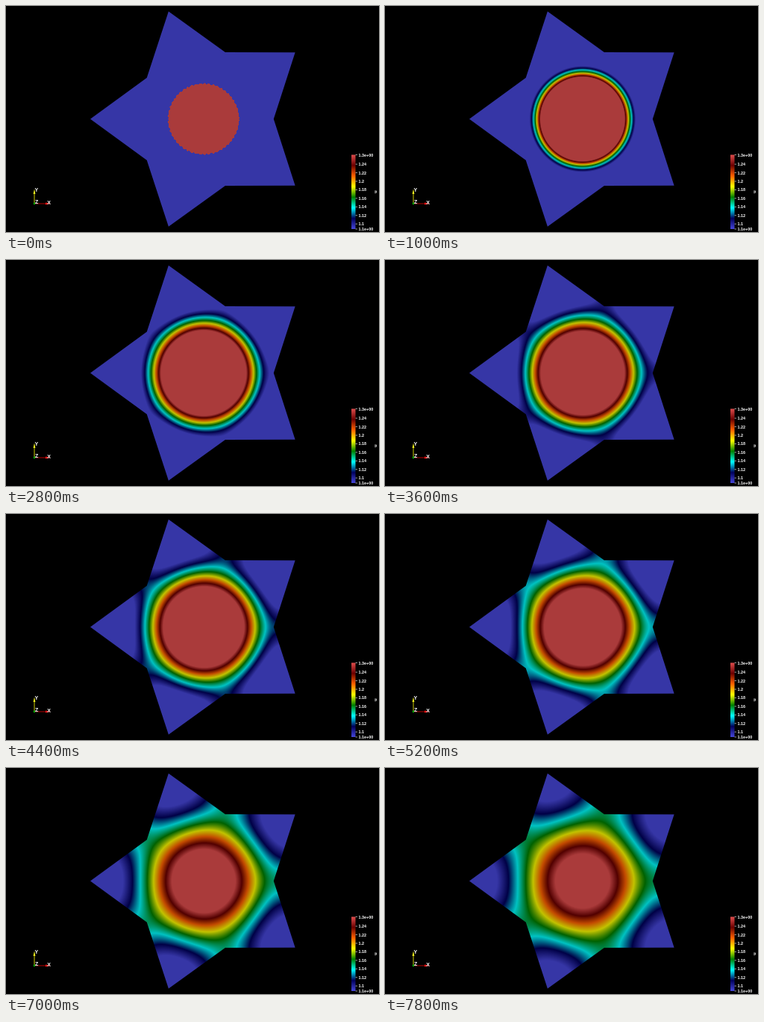
Recreate the animation shown at these times as an HTML page with a canvas. Size 500 by 303 pixels, loop 8000 ms.

```html
<!DOCTYPE html>
<html lang="en">
<head>
<meta charset="utf-8">
<title>Heat diffusion on a star</title>
<style>
  html, body { margin: 0; width: 100%; height: 100%; overflow: hidden; background: #000; }
  canvas, svg { position: absolute; left: 0; top: 0; width: 500px; height: 303px; }
  text { font-family: "Liberation Sans", Arial, sans-serif; font-weight: bold; fill: #fff; }
</style>
</head>
<body>
<canvas id="field" width="500" height="303"></canvas>
<svg id="overlay" viewBox="0 0 500 303">
  <defs><linearGradient id="scale" x1="0" y1="1" x2="0" y2="0"></linearGradient></defs>
  <path d="M38 265V251" stroke="#cccc00"/>
  <path d="M36.6 252L38 245.5L39.4 252Z" fill="#ffff20"/>
  <path d="M38 265H54" stroke="#b00000"/>
  <path d="M53 263.6L60 265L53 266.4Z" fill="#f01818"/>
  <circle cx="38" cy="265" r="1.4" fill="#00a000"/>
  <g font-size="7">
    <text x="38.5" y="248.5">Y</text>
    <text x="55.2" y="266">X</text>
    <text x="39" y="265">Z</text>
  </g>
  <rect x="463" y="199.5" width="5.5" height="99.5" fill="url(#scale)"/>
  <g id="labels" font-size="5.4"></g>
  <text transform="translate(497 251) rotate(-90)" font-size="6">u</text>
</svg>
<script>
const W = 500, H = 303, CX = 264.8, CY = 151.5;
const OUTER = 151.8, INNER = 94, DISC = 47.5;
const FRAME_MS = 200, FRAMES = 40;
const SUBSTEPS = 200, RATE = 40.5 / SUBSTEPS;   // diffusion per frame, in px²
const LOW = 1.088, HIGH = 1.262, SHADE = 0.76;
const PALETTE = [[71, 71, 219], [0, 0, 92], [0, 255, 255], [0, 128, 0],
                 [255, 255, 0], [255, 97, 0], [107, 0, 0], [224, 77, 77]];
const SECTOR = Math.PI / 5;
const byId = id => document.getElementById(id);

// Star outline
const corners = Array.from({ length: 10 }, (_, i) => {
  const r = i % 2 ? OUTER : INNER;
  return `${CX + r * Math.cos(i * SECTOR)}px ${CY + r * Math.sin(i * SECTOR)}px`;
});
const canvas = byId('field');
canvas.style.clipPath = `polygon(${corners})`;

// Slightly enlarged, so that the clip edge is always covered
function insideStar(x, y) {
  const r = Math.hypot(x, y) / 1.01;
  const turn = Math.abs(Math.atan2(y, x)) % (2 * SECTOR);
  const a = Math.min(turn, 2 * SECTOR - turn);
  const ex = OUTER * Math.cos(SECTOR) - INNER, ey = OUTER * Math.sin(SECTOR);
  return ex * r * Math.sin(a) - ey * (r * Math.cos(a) - INNER) >= 0;
}

// The field is symmetric about the x axis: only the lower half is solved.
const MID = 151, ROWS = 152;
const ids = new Int32Array(W * ROWS).fill(-1);
const cells = [];
for (let j = 0; j < ROWS; j++)
  for (let x = 0; x < W; x++)
    if (insideStar(x + 0.5 - CX, j)) {
      ids[j * W + x] = cells.length;
      cells.push([x, j]);
    }

const count = cells.length;
const near = new Int32Array(count * 4);
cells.forEach(([x, j], i) => {
  [[x - 1, j], [x + 1, j], [x, Math.abs(j - 1)], [x, j + 1]].forEach(([nx, nj], n) => {
    const id = nj < ROWS ? ids[nj * W + nx] : -1;
    near[i * 4 + n] = id < 0 ? i : id;            // insulated boundary
  });
});

const start = Float32Array.from(cells, ([x, j]) => {
  const dx = x + 0.5 - CX;
  const ragged = 0.6 * Math.sin(50 * Math.atan2(j, dx));
  return Math.hypot(dx, j) < DISC + ragged ? 2 : 1;
});
const states = [start];

function diffuse(from) {
  let u = from.slice(), next = new Float32Array(count);
  for (let s = 0; s < SUBSTEPS; s++) {
    for (let i = 0, n = 0; i < count; i++, n += 4)
      next[i] = u[i] + RATE * (u[near[n]] + u[near[n + 1]] + u[near[n + 2]] + u[near[n + 3]] - 4 * u[i]);
    [u, next] = [next, u];
  }
  return u;
}

function stateAt(k) {
  while (states.length <= k) states.push(diffuse(states[states.length - 1]));
  return states[k];
}

const ctx = canvas.getContext('2d');
const image = ctx.createImageData(W, H);
function draw(k) {
  const u = stateAt(k), data = image.data;
  cells.forEach(([x, j], i) => {
    const v = Math.min(1, Math.max(0, (u[i] - LOW) / (HIGH - LOW))) * 7;
    const band = Math.min(6, Math.floor(v)), f = v - band;
    const a = PALETTE[band], b = PALETTE[band + 1];
    for (const y of [MID - j, MID + j]) {
      const p = (y * W + x) * 4;
      for (let c = 0; c < 3; c++) data[p + c] = SHADE * (a[c] + (b[c] - a[c]) * f);
      data[p + 3] = 255;
    }
  });
  ctx.putImageData(image, 0, 0);
}

// Colour scale
byId('scale').innerHTML = PALETTE.map((c, i) =>
  `<stop offset="${i / 7}" stop-color="rgb(${c})"/>`).join('');
const label = (y, text) =>
  `<path d="M468.5 ${y}h2.5" stroke="#fff" stroke-width=".6"/><text x="472.5" y="${y + 2}">${text}</text>`;
let labels = label(199.5, '1.3e+00') + label(299, '1.1e+00');
for (let i = 0; i < 8; i++) labels += label(292.2 - i * 11.44, String(+(1.1 + i * 0.02).toFixed(2)));
byId('labels').innerHTML = labels;

let shown = -1;
const begin = performance.now();
function tick() {
  const k = Math.floor((performance.now() - begin) / FRAME_MS) % FRAMES;
  if (k !== shown) draw(shown = k);
  requestAnimationFrame(tick);
}
tick();
</script>
</body>
</html>
```
